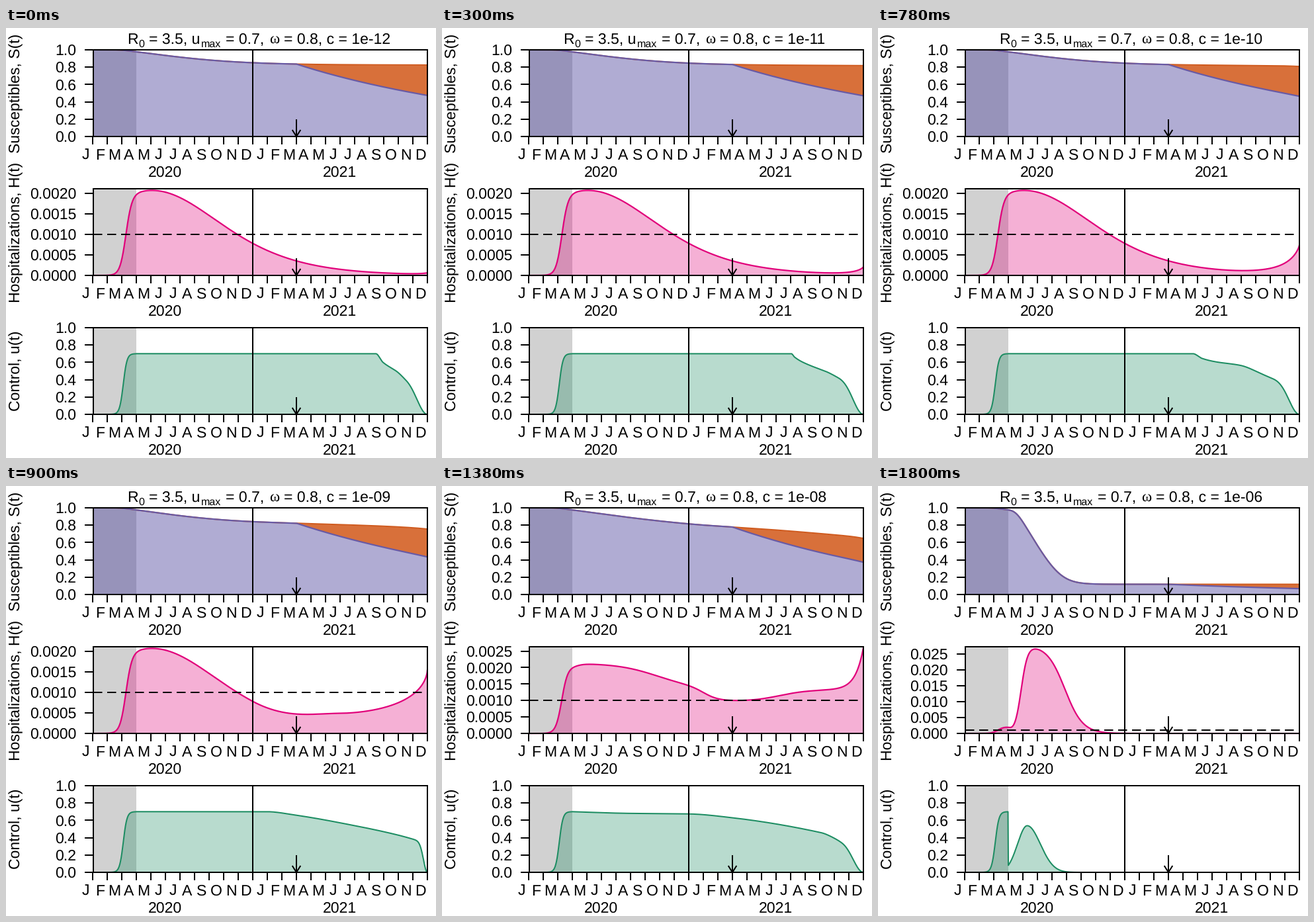
A matplotlib script for the animation above (2100 ms loop, 650 by 650 pixels).

```python
import numpy as np
import matplotlib.pyplot as plt
from matplotlib.animation import FuncAnimation
from matplotlib.patches import Rectangle

plt.rcParams.update({"font.family": "Liberation Sans", "text.hinting": "none",
                     "text.hinting_factor": 1, "lines.scale_dashes": False})

SIZE, DPI, PT = 650, 100, 0.72          # PT: points per pixel
FONT = 23.4
LEFT, RIGHT, HEIGHT = 132, 637, 131     # panel box
JAN, MONTH = 109, 22                    # January 2020, width of a month
LOCK, NEW_YEAR, ARROW = 196.5, 373, 439
BASES = (164, 374, 584)

PURPLE, PURPLE_LINE = "#534b9f", "#685aa5"
ORANGE, ORANGE_LINE = "#d8703a", "#cf5a1e"
PINK, GREEN, GREY = "#e1007a", "#1b8c61", "#d1d1d1"

X = np.arange(LEFT, RIGHT + 0.5, 0.5)
TOP = 0.7 * HEIGHT                      # strongest control
LEAD = 8                                # infections run ahead of hospital stays
VACCINATION = 0.0028                    # uptake per pixel of time


def step(x, centre, width):
    return 1 / (1 + np.exp(-(x - centre) / width))


def steps(*parts):
    """Sum of soft steps given as (height, centre, width)."""
    return lambda x: sum(h * step(x, c, w) for h, c, w in parts)


def wave(x):
    """One epidemic wave held down by full control."""
    return 128.6 * step(x, 181, 4.5) / np.cosh((x - 220) / 143) ** 2


def rebound(x, size, span, power):
    """Rise towards the end of the window."""
    left = np.clip(RIGHT - x, 0, None)
    ramp = np.clip((x - NEW_YEAR) / 127, 0, 1)
    return size * np.exp(-(left / span) ** power) * ramp ** 2 * (3 - 2 * ramp)


def through(points):
    """Monotone cubic through a few (x, height) points."""
    x, y = np.array(points, float).T
    h = np.diff(x)
    d = np.diff(y) / h
    a, b = d[:-1], d[1:]
    same = a * b > 0
    m = np.r_[d[0], np.where(same, 2 * a * b / np.where(same, a + b, 1), 0), d[-1]]
    k = np.clip(np.searchsorted(x, X, "right") - 1, 0, len(h) - 1)
    t = np.clip((X - x[k]) / h[k], 0, 1)
    return (y[k] * (1 + 2 * t) * (1 - t) ** 2 + y[k + 1] * t * t * (3 - 2 * t)
            + h[k] * t * (1 - t) * (m[k] * (1 - t) - m[k + 1] * t))


def bump(peak, centre, left, right):
    return peak * np.exp(-((X - centre) / np.where(X < centre, left, right)) ** 2)


# Per scenario: hospital course, its rebound, pixels per 0.001, tick step, ticks, decimals
HOSPITAL = [
    (wave, (2.5, 14, 0.8), 62, 0.0005, 5, 4),
    (wave, (11.5, 14.7, 0.8), 62, 0.0005, 5, 4),
    (wave, (44.5, 22.4, 0.8), 62, 0.0005, 5, 4),
    (wave, (95, 67, 0.6), 62, 0.0005, 5, 4),
    (steps((101, 181, 4.5), (5, 205, 6), (-38, 325, 30), (-20, 396, 11), (18, 510, 22)),
     (64, 12, 1), 49.8, 0.0005, 6, 4),
    (steps((25.2, 181, 4.5), (107, 217.6, 5.3), (-40, 257.5, 6.5), (-36, 315, 13),
           (-56.2, 462, 25)), (0, 1, 1), 12.4, 0.002, 6, 3),
    (steps((9.8, 181, 4.5), (-9.8, 200, 3), (134, 216.4, 4.9), (-134, 282.5, 13.5)),
     (0, 1, 1), 4.82, 0.005, 6, 3),
]

# Share never infected at the end
SPARED = (0.825, 0.818, 0.808, 0.755, 0.648, 0.225, 0.118)

# Control after the lockdown, and how early it is released at the end
CONTROL = [
    (through([(LOCK, TOP), (559, TOP), (570, 78.5), (590, 66), (605, 58), (637, 55)]), 22),
    (through([(LOCK, TOP), (528, TOP), (533, 86.5), (545, 79), (580, 65), (600, 58),
              (637, 56)]), 22),
    (through([(LOCK, TOP), (476, TOP), (490, 84.5), (510, 79.5), (548, 74), (600, 55.5),
              (637, 54)]), 22),
    (through([(LOCK, TOP), (394, TOP), (439, 86.3), (530, 70), (590, 57), (637, 44)]), 8),
    (through([(LOCK, TOP), (280, 89.2), (373, 88.3), (439, 82.5), (573, 60), (605, 50),
              (637, 50)]), 22),
    (through([(LOCK, 43.5), (215, 72), (228, 84), (243, 85.5), (251, 88), (262, 80.7),
              (285, 70.5), (310, 67), (373, 36.5), (420, 13.5), (455, 3.5), (500, 0),
              (637, 0)]), 22),
    (bump(70.5, 225.5, 20.7, 28.2), 22),
]


def hospital(i, x):
    course, late = HOSPITAL[i][:2]
    return course(x) + rebound(x, *late)


def susceptible(i):
    """Falls with the running total of hospital stays."""
    total = np.cumsum(hospital(i, X + LEAD))
    return HEIGHT * (1 - (1 - SPARED[i]) * total / total[-1])


def control(i):
    plan, release = CONTROL[i]
    plan = plan * (1 - np.exp(-((RIGHT - X) / release) ** 2))
    return np.where(X <= LOCK, TOP * step(X, 177.3, 2.8), plan)


fig = plt.figure(figsize=(SIZE / DPI, SIZE / DPI), dpi=DPI, facecolor="white")
ax = fig.add_axes([0, 0, 1, 1])


def line(x, y, color="black", width=2, z=5, **kw):
    kw.setdefault("solid_capstyle", "butt")
    ax.plot(x, y, color=color, lw=width * PT, zorder=z, **kw)


def label(x, y, text, size=FONT, ha="center", **kw):
    ax.text(x, y, text, fontsize=size * PT, ha=ha, va="baseline", **kw)


def area(low, high, base, color, alpha):
    ax.fill_between(X, base - low, base - high, color=color, alpha=alpha, lw=0, zorder=2)


def panel(base, name, ticks):
    """Box, axes and markers; ticks holds (height, text) pairs."""
    top = base - HEIGHT
    ax.add_patch(Rectangle((LEFT, top), LOCK - LEFT, HEIGHT, color=GREY, lw=0, zorder=1))
    ax.add_patch(Rectangle((LEFT, top), RIGHT - LEFT, HEIGHT, fill=False,
                           ec="black", lw=2 * PT, zorder=5))
    line([NEW_YEAR] * 2, [top, base])
    line([ARROW] * 2, [base - 26, base], z=6)
    line([ARROW - 6.3, ARROW, ARROW + 6.3], [base - 10, base, base - 10], z=6)
    for k, letter in enumerate("JFMAMJJASOND" * 2):
        x = JAN + MONTH * k
        line([x + MONTH] * 2, [base, base + 12])
        label(x + MONTH / 2, base + 35, letter)
    for k, year in enumerate(("2020", "2021")):
        label(240.5 + 12 * MONTH * k, base + 61, year)
    for h, text in ticks:
        line([119, LEFT], [base - h] * 2)
        label(106, base - h + 8, text, 23, "right")
    label(21.7, base - HEIGHT / 2, name, rotation=90, rotation_mode="anchor")


def title(i):
    y, small = 24, FONT * 0.7
    label(183.3, y, "R", ha="left")
    label(200.2, y + 4.5, "0", small, "left")
    label(215.8, y, "= 3.5, u", ha="left")
    label(294.5, y + 4.5, "max", small, "left")
    label(332, y, "= 0.7,", ha="left")
    label(397.7, y, "ω", ha="left", family="Liberation Serif")
    label(420.3, y, f"= 0.8, c = 1e-{12 - i:02d}", ha="left")


def draw(i):
    ax.clear()
    ax.set(xlim=(0, SIZE), ylim=(SIZE, 0))
    ax.axis("off")
    title(i)
    unit = [(v * HEIGHT, f"{v:.1f}") for v in np.arange(6) / 5]
    scale, gap, count, digits = HOSPITAL[i][2:]
    rates = [(v * 1000 * scale, f"{v:.{digits}f}") for v in gap * np.arange(count)]

    base = BASES[0]
    free = susceptible(i)
    vacc = free * np.exp(-VACCINATION * np.clip(X - ARROW, 0, None))
    area(0, vacc, base, PURPLE, 0.46)
    area(vacc, free, base, ORANGE, 1)
    line(X, base - free, ORANGE_LINE, z=3)
    line(X, base - vacc, PURPLE_LINE, 2.2, z=4)
    panel(base, "Susceptibles, S(t)", unit)

    base = BASES[1]
    y = hospital(i, X)
    area(0, y, base, PINK, 0.31)
    line(X, base - y, PINK, 2.2, z=4)
    panel(base, "Hospitalizations, H(t)", rates)
    line([LEFT, RIGHT], [base - scale] * 2, ls=(0, (13.5 * PT, 7.5 * PT)))

    base = BASES[2]
    y = control(i)
    area(0, y, base, GREEN, 0.31)
    line(X, base - y, GREEN, z=4)
    panel(base, "Control, u(t)", unit)
    return []


anim = FuncAnimation(fig, draw, frames=7, interval=300, repeat=True, repeat_delay=0)
plt.show()
```
